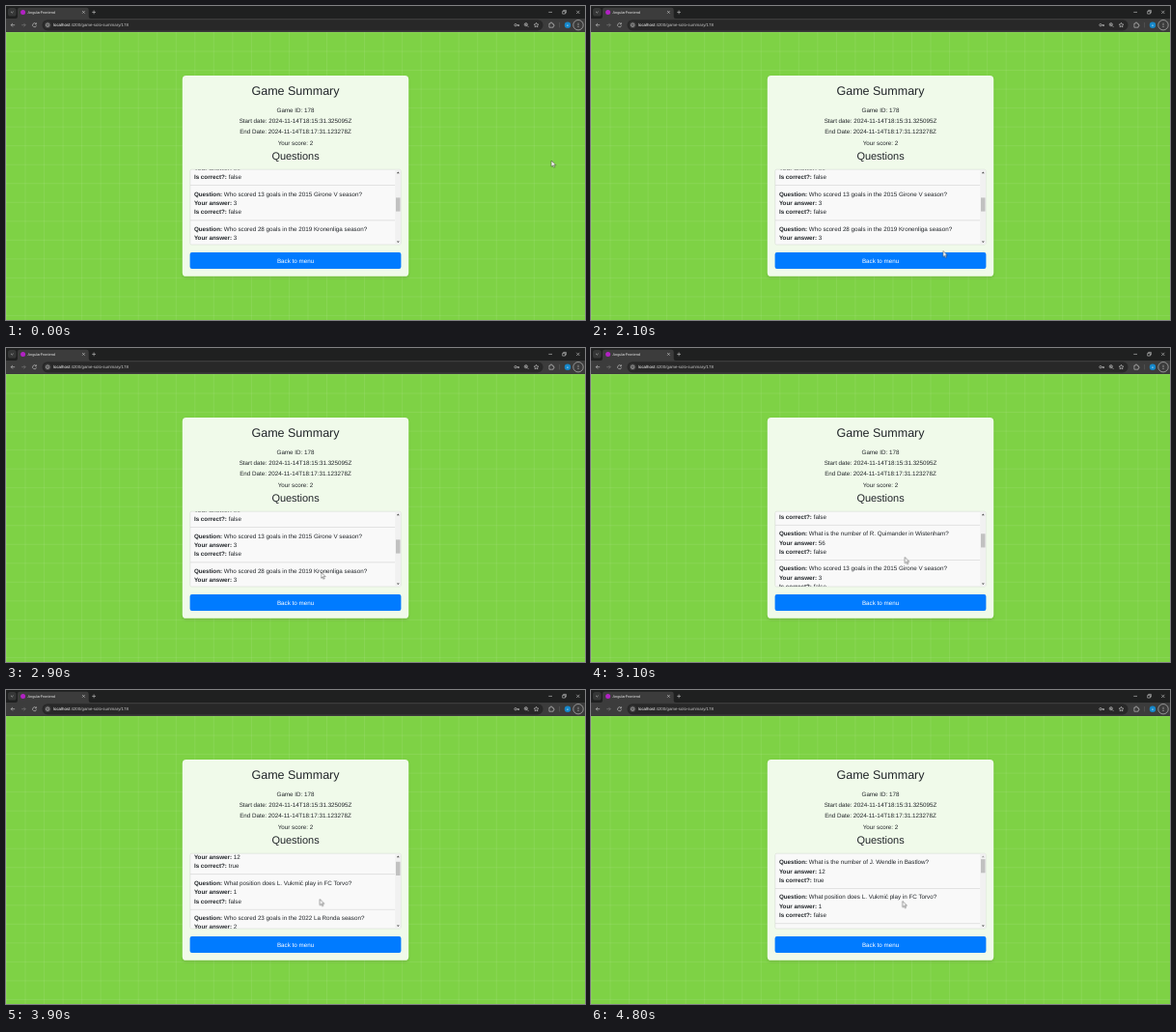
Write an HTML page that moves like this. It is 600 px wide and 325 px high and loops after 5000 ms.

```html
<!DOCTYPE html>
<html lang="en">
<head>
<meta charset="utf-8">
<title>Game Summary</title>
<style>
@property --scroll { syntax: "<number>"; inherits: true; initial-value: 0; }
html, body { margin: 0; width: 100%; height: 100%; overflow: hidden; background: #7ed245; }
svg { display: block; width: 600px; height: 325px; }
text { font-family: "Liberation Sans", Arial, sans-serif; font-size: 6.25px; fill: #212529; text-rendering: geometricPrecision; }
.mid { text-anchor: middle; }
.bold { font-weight: 700; }
.icon { fill: none; stroke: #d8d8d8; stroke-width: .55; }

/* Every change is a hard step on a 100 ms clock: 2% each. */
#list, #pointer, #hand, #arrow, #button, #upArrow { animation: 5s step-end infinite; }
#list { animation-name: scroll; }
#rows { transform: translateY(calc(var(--scroll) * -1px)); }
#thumb { transform: translateY(calc(var(--scroll) * .1807px)); }
#pointer { animation-name: move; }
#hand { animation-name: hand; }
#arrow { animation-name: arrow; }
#button { animation-name: hover; }
#upArrow { animation-name: disable; }

@keyframes scroll {
  0% { --scroll: 128.9 }
  62% { --scroll: 95 } 64% { --scroll: 90.4 } 66% { --scroll: 89.8 }
  70% { --scroll: 54.8 } 72% { --scroll: 51.2 } 74% { --scroll: 50.8 }
  78% { --scroll: 14.7 } 80% { --scroll: 11.7 }
  84% { --scroll: 2 } 86% { --scroll: .4 } 88%, 100% { --scroll: 0 }
}
@keyframes move {
  0% { transform: translate(565.2px, 160px) }
  28% { transform: translate(561px, 161px) }
  30% { transform: translate(540px, 168px) }
  32% { transform: translate(508px, 182px) }
  34% { transform: translate(472px, 198px) }
  36% { transform: translate(440px, 212px) }
  38% { transform: translate(412px, 224px) }
  40% { transform: translate(387px, 241px) }
  42% { transform: translate(364.8px, 253.4px) }
  44% { transform: translate(350px, 259px) }
  46% { transform: translate(340px, 260px) }
  48% { transform: translate(333px, 260.5px) }
  50%, 52% { transform: translate(329.6px, 260.6px) }
  54% { transform: translate(329px, 258px) }
  56% { transform: translate(328px, 246px) }
  58% { transform: translate(326.5px, 232px) }
  60% { transform: translate(325.5px, 220px) }
  62% { transform: translate(325.2px, 216.5px) }
  92% { transform: translate(324.2px, 217.3px) }
  94% { transform: translate(323.2px, 218px) }
  96%, 100% { transform: translate(322.8px, 218.5px) }
}
@keyframes hand { 0%, 56%, 100% { opacity: 0 } 44% { opacity: 1 } }
@keyframes arrow { 0%, 56%, 100% { opacity: 1 } 44% { opacity: 0 } }
@keyframes hover { 0%, 56%, 100% { fill: #007bff } 44% { fill: #0056b3 } }
@keyframes disable { 0% { fill: #505050 } 88%, 100% { fill: #a3a3a3 } }
</style>
</head>
<body>
<svg viewBox="0 0 600 325">
  <defs>
    <pattern id="grid" y="27" width="19.53" height="19.53" patternUnits="userSpaceOnUse">
      <path d="M0 .39H19.53M.39 0V19.53" stroke="#fff" stroke-opacity=".11" stroke-width=".78"/>
    </pattern>
    <clipPath id="view"><rect x="191" y="169.4" width="218" height="77.4"/></clipPath>
    <filter id="shadow" x="-10%" y="-10%" width="120%" height="120%">
      <feDropShadow dx="0" dy="1.5" stdDeviation="1.6" flood-opacity=".12"/>
    </filter>
  </defs>

  <rect y="27" width="600" height="298" fill="#7ed245"/>
  <rect y="27" width="600" height="298" fill="url(#grid)"/>

  <g id="browser">
    <rect width="600" height="14" fill="#1f2020"/>
    <rect y="13" width="600" height="14" fill="#3c3c3c"/>
    <rect x="2" y="2" width="8.6" height="8.6" rx="2.6" fill="#363737"/>
    <path d="M10 13Q12 13 12 11V4Q12 1.8 14.2 1.8H83.5Q85.7 1.8 85.7 4V11Q85.7 13 87.7 13Z" fill="#3c3c3c"/>
    <circle cx="17.6" cy="6.4" r="2.5" fill="#b222c4"/>
    <text x="22.5" y="7.8" style="font-size:3.82px;fill:#e6e6e6">AngularFrontend</text>
    <path class="icon" d="M5 5.8L6.3 7L7.6 5.8M79.1 5.1L81.7 7.7M81.7 5.1L79.1 7.7M89.2 6.4H93M91.1 4.5V8.3M562.3 6.4H566M576.7 5.4H579.4V8.1H576.7ZM577.7 5.4V4.4H580.4V7.1H579.4M591.2 4.8L594.4 8M594.4 4.8L591.2 8"/>
    <path class="icon" d="M9.2 19.7H5.2M7 17.9L5.2 19.7L7 21.5"/>
    <path class="icon" style="stroke:#858585" d="M16.2 19.7H20.2M18.4 17.9L20.2 19.7L18.4 21.5"/>
    <path class="icon" d="M31.2 18.6A2 2 0 1 0 31.5 20.2M31.4 17.3V18.8H29.9"/>
    <rect x="37.5" y="14.2" width="519" height="11.2" rx="5.6" fill="#282828"/>
    <circle cx="43.2" cy="19.7" r="3.4" fill="#3c3c3c"/>
    <circle class="icon" cx="43.2" cy="19.7" r="1.8"/>
    <path class="icon" d="M43.2 19.3V20.8M43.2 18.5V18.9"/>
    <text x="49" y="21.3" style="font-size:4.38px;fill:#c6c6c6"><tspan fill="#fff">localhost</tspan>:4200/game-solo-summary/178</text>
    <g class="icon">
      <circle cx="528" cy="19.7" r="1.2"/>
      <path d="M529.2 19.7H532M530.3 19.7V21M531.5 19.7V21"/>
      <circle cx="538.8" cy="19.2" r="1.6"/>
      <path d="M540 20.4L541.5 21.9M538 19.2H539.6M538.8 18.4V20"/>
      <path d="M549.5 17.3L550.2 18.9L551.9 19.1L550.6 20.2L551 21.9L549.5 21L548 21.9L548.4 20.2L547.1 19.1L548.8 18.9Z"/>
      <path d="M562.9 18.2H564.1Q564.1 16.8 565 16.8T565.9 18.2H567.1V19.3Q568.3 19.3 568.3 20.1T567.1 21V22.2H562.9Z"/>
      <path d="M573.6 17V22.4" stroke="#666"/>
    </g>
    <circle cx="582" cy="19.7" r="3.2" fill="#1687c9"/>
    <text class="mid" x="582" y="20.7" style="font-size:2.9px;fill:#e8f4fb">io</text>
    <circle class="icon" cx="593" cy="19.7" r="5.2"/>
    <path d="M593 17.8V22" stroke="#e5e5e5" stroke-width=".8" stroke-dasharray=".8 .8"/>
  </g>

  <rect x="182.8" y="72" width="234.4" height="207.8" rx="3.9" fill="#f0faea" filter="url(#shadow)"/>
  <text class="mid" x="300" y="91.8" style="font-size:12.5px">Game Summary</text>
  <text class="mid" x="300" y="109.6">Game ID: 178</text>
  <text class="mid" x="300" y="121">Start date: 2024-11-14T18:15:31.325095Z</text>
  <text class="mid" x="300" y="132.4">End Date: 2024-11-14T18:17:31.123278Z</text>
  <text class="mid" x="300" y="143.8">Your score: 2</text>
  <text class="mid" x="300" y="158.6" style="font-size:10.94px">Questions</text>

  <g id="list">
    <rect x="190.8" y="169.2" width="218.4" height="77.8" rx="1.6" fill="#f9f9f9" stroke="#c8ccc6" stroke-width=".4"/>
    <g clip-path="url(#view)">
      <g id="rows"></g>
      <rect x="403.3" y="169.4" width="5.9" height="77.6" fill="#f1f1f1"/>
      <rect id="thumb" x="404" y="175.1" width="4.5" height="14.2" fill="#c1c1c1"/>
      <path id="upArrow" d="M404.8 173.2L406.3 171.5L407.8 173.2Z"/>
      <path d="M404.8 243.4L406.3 245.1L407.8 243.4Z" fill="#505050"/>
    </g>
  </g>

  <rect id="button" x="190.6" y="254.9" width="218.8" height="17.2" rx="2"/>
  <text class="mid" x="300" y="265.8" style="fill:#fff">Back to menu</text>

  <g id="pointer">
    <path id="arrow" d="M0 0V6.3L1.5 5L2.5 7.2L3.5 6.8L2.5 4.6H4.5Z" fill="#fff" stroke="#222" stroke-width=".45"/>
    <path id="hand" d="M-.6 .5Q0 -.4 .6 .5V2.7L2.9 3.3Q3.5 3.5 3.4 4.3L2.8 7.2H-.5L-2.4 4.6Q-2 3.8 -1.2 4.3L-.6 4.8Z" fill="#fff" stroke="#222" stroke-width=".4"/>
  </g>
</svg>
<script>
const questions = [
  ["What is the number of J. Wendle in Bastlow?", 12, true],
  ["What position does L. Vukmić play in FC Torvo?", 1, false],
  ["Who scored 23 goals in the 2022 La Ronda season?", 2, false],
  ["What is the number of R. Quimander in Wistenham?", 56, false],
  ["Who scored 13 goals in the 2015 Girone V season?", 3, false],
  ["Who scored 28 goals in the 2019 Kronenliga season?", 3, false]
];
const labels = ["Question:", "Your answer:", "Is correct?:"];
const ROW = 36.33, LINE = 9.375, TOP = 169.4;

document.getElementById("rows").innerHTML = questions.map((values, i) => {
  const top = TOP + i * ROW;
  const lines = labels.map((label, j) =>
    `<text x="194.9" y="${top + 10.75 + j * LINE}"><tspan class="bold">${label}</tspan> ${values[j]}</text>`);
  const border = `<rect x="191" y="${top + ROW - .45}" width="212.3" height=".45" fill="#c4c4c4"/>`;
  return lines.join("") + border;
}).join("");
</script>
</body>
</html>
```
